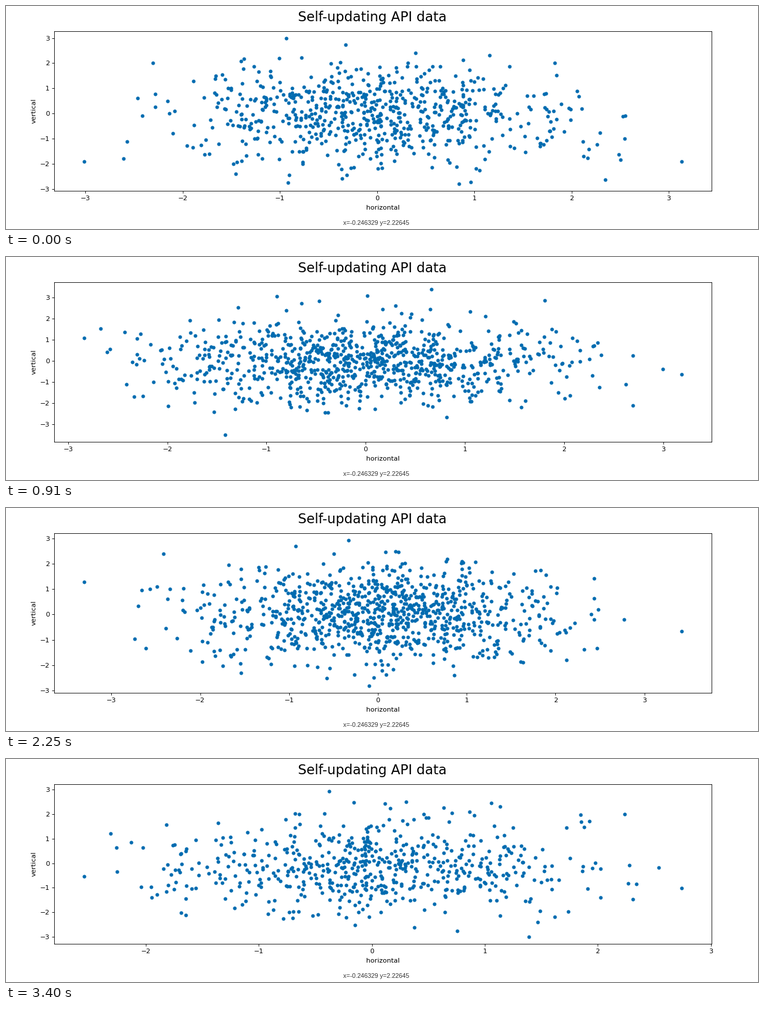
Write a matplotlib script that moves like this. It is 1280 by 380 pixels and loops after 3900 ms.

```python
import numpy as np
import matplotlib.pyplot as plt
from matplotlib.animation import FuncAnimation
from matplotlib.ticker import MultipleLocator

W, H, DPI = 1280, 380, 80
LEFT, RIGHT, TOP, BOTTOM = 82, 1201, 43, 315
TICK_MS = 50
MARGIN = 0.05

# Duration in ms, point count, x range, y range
BATCHES = [
    (550, 700, (-3.015, 3.133), (-2.776, 2.981)),
    (600, 900, (-2.839, 3.184), (-3.503, 3.386)),
    (550, 920, (-3.111, 3.549), (-3.322, 3.415)),
    (550, 118, (-2.731, 2.469), (-3.363, 2.483)),
    (600, 940, (-3.307, 3.420), (-2.800, 2.911)),
    (550, 114, (-2.101, 3.537), (-2.294, 2.021)),
    (500, 600, (-2.546, 2.743), (-2.998, 2.931)),
]


def normal_cloud(seed, count, ranges):
    """Normally distributed points that exactly span the given ranges."""
    low, high = np.transpose(ranges)
    cloud = np.random.default_rng(seed).normal(size=(count * 2, 2))
    cloud = cloud[((cloud > low) & (cloud < high)).all(axis=1)][:count]
    for axis in (0, 1):
        cloud[cloud[:, axis].argmin(), axis] = low[axis]
        cloud[cloud[:, axis].argmax(), axis] = high[axis]
    return cloud


def padded(low, high):
    pad = MARGIN * (high - low)
    return low - pad, high + pad


def stage_text(x, y, text, **style):
    fig.text(x / W, 1 - y / H, text, ha="center", **style)


clouds = [normal_cloud(seed, count, ranges)
          for seed, (_, count, *ranges) in enumerate(BATCHES, start=1)]
ends = np.cumsum([batch[0] for batch in BATCHES])

plt.rcParams.update({"font.family": "DejaVu Sans", "font.size": 10.25})
fig = plt.figure(figsize=(W / DPI, H / DPI), dpi=DPI, facecolor="white")
ax = fig.add_axes([LEFT / W, 1 - BOTTOM / H, (RIGHT - LEFT) / W, (BOTTOM - TOP) / H])
ax.xaxis.set_major_locator(MultipleLocator(1))
ax.yaxis.set_major_locator(MultipleLocator(1))
ax.set_xlabel("horizontal", labelpad=5.2)
ax.set_ylabel("vertical")
dots = ax.scatter([], [], s=21, color="#006bb0")

stage_text(623.5, 19.5, "Self-updating API data", fontsize=20.5, va="center")
stage_text(630.3, 373, "x=-0.246329 y=2.22645", fontsize=9.6, va="baseline",
           family="Liberation Sans", color="#333333")


def update(frame):
    index = np.searchsorted(ends, frame * TICK_MS, side="right")
    x_range, y_range = BATCHES[index][2:]
    dots.set_offsets(clouds[index])
    ax.set_xlim(padded(*x_range))
    ax.set_ylim(padded(*y_range))
    return [dots]


anim = FuncAnimation(fig, update, frames=int(ends[-1]) // TICK_MS,
                     interval=TICK_MS, repeat=True, repeat_delay=0)
plt.show()
```
